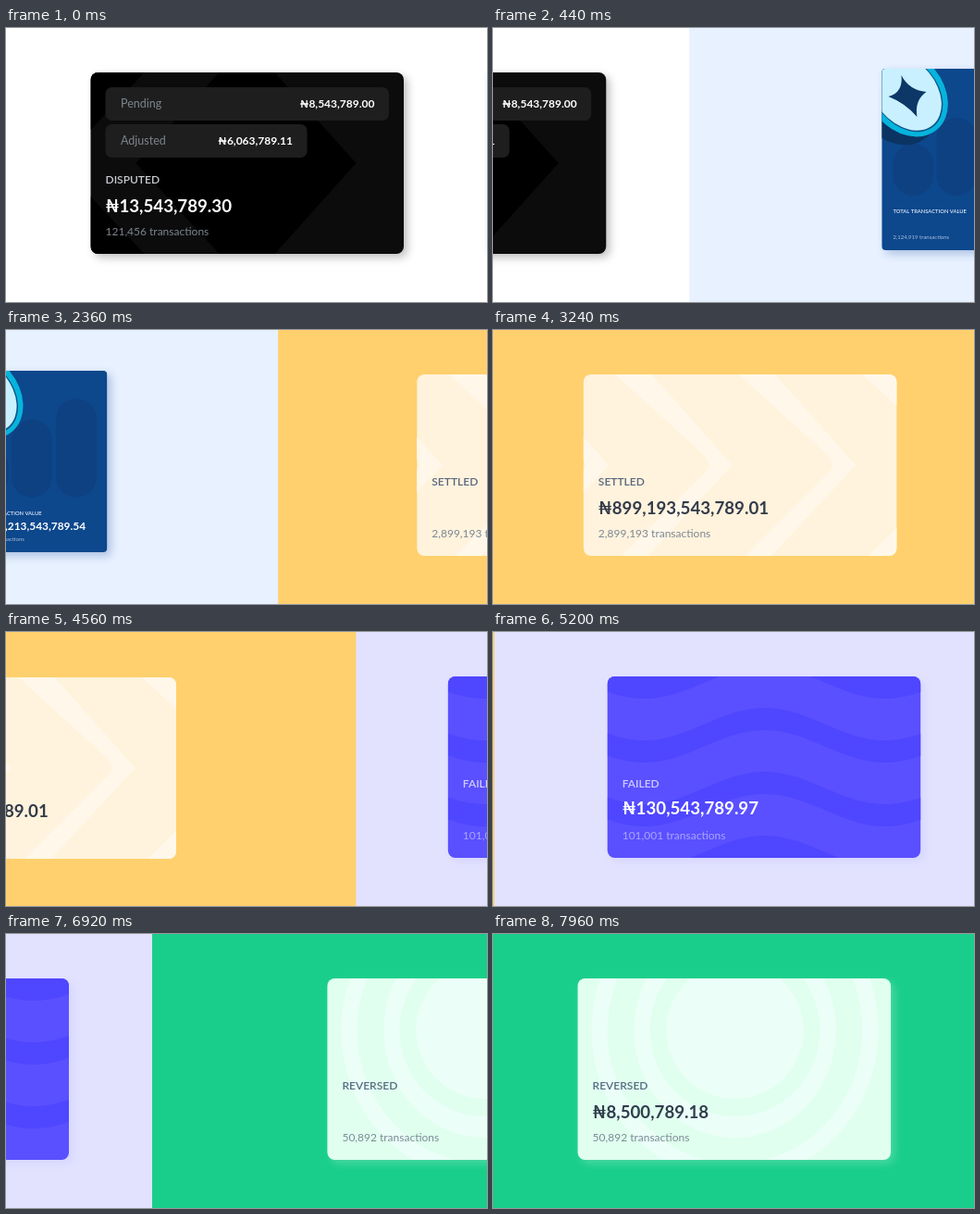
Recreate the animation shown at these times as an HTML page with a canvas. Size 520 by 296 pixels, loop 8 s.

```html
<!DOCTYPE html>
<html lang="en">
<head>
<meta charset="utf-8">
<title>Transaction cards</title>
<style>
  html, body { margin: 0; width: 100%; height: 100%; overflow: hidden; }
  canvas { display: block; }
</style>
</head>
<body>
<canvas id="stage" width="520" height="296"></canvas>
<script>
const ctx = document.getElementById('stage').getContext('2d');
const W = 520, H = 296, LOOP = 8000;
const SLIDE_STARTS = [0, 1960, 4200, 6440];

const clamp = v => Math.min(1, Math.max(0, v));

// Cubic bezier easing with control points (x1, 0) and (x2, 1).
function bezier(x1, x2) {
  return x => {
    x = clamp(x);
    let lo = 0, hi = 1, s = 0.5;
    for (let i = 0; i < 24; i++) {
      s = (lo + hi) / 2;
      const r = 1 - s;
      if (3 * s * r * r * x1 + 3 * s * s * r * x2 + s ** 3 < x) lo = s; else hi = s;
    }
    return s * s * (3 - 2 * s);
  };
}
const panelEase = bezier(0.62, 0.06);
const cardEase = bezier(0.33, 0);

function polygon(color, ...points) {
  ctx.fillStyle = color;
  ctx.beginPath();
  points.forEach(([x, y]) => ctx.lineTo(x, y));
  ctx.fill();
}

function roundRect(color, x, y, w, h, r) {
  ctx.fillStyle = color;
  ctx.beginPath();
  ctx.roundRect(x, y, w, h, r);
  ctx.fill();
}

function ellipse(color, x, y, rx, ry, tilt = 0) {
  ctx.fillStyle = color;
  ctx.beginPath();
  ctx.ellipse(x, y, rx, ry, tilt, 0, Math.PI * 2);
  ctx.fill();
}

function text(str, x, y, size, weight, color, align = 'left') {
  ctx.font = `${weight} ${size}px Lato, "Open Sans", sans-serif`;
  ctx.textAlign = align;
  ctx.fillStyle = color;
  ctx.fillText(str, x, y);
}

function pill(y, width, name, amount) {
  roundRect('#1e1e1e', 16, y, width, 36, 7);
  text(name, 32.5, y + 22, 12.5, 400, '#7f858e');
  text(amount, width + 0.5, y + 22, 12, 700, '#fff', 'right');
}

function drawDisputed() {
  polygon('#000', [139, 0], [199, 0], [287, 98], [199, 196], [139, 196], [49, 98]);
  polygon('#000', [0, 0], [58, 0], [0, 62]);
  polygon('#000', [0, 196], [58, 196], [0, 134]);
  pill(16, 306.5, 'Pending', '₦8,543,789.00');
  pill(56, 218, 'Adjusted', '₦6,063,789.11');
}

function drawCoin() {
  const tilt = 50 * Math.PI / 180;
  ellipse('#0c3463', 14, 35, 52, 40, tilt);
  ellipse('#06b4dc', 26, 26, 52, 40, tilt);
  ellipse('#0d5486', 26, 26, 47, 34, tilt);
  ellipse('#c9f0ff', 25.5, 25.5, 46, 33, tilt);
  ctx.fillStyle = '#0c3766';
  ctx.beginPath();
  ctx.moveTo(21, 7);
  ctx.quadraticCurveTo(29, 23, 48, 25);
  ctx.quadraticCurveTo(35, 34, 38, 52);
  ctx.quadraticCurveTo(25, 37, 7, 30);
  ctx.quadraticCurveTo(23, 26, 21, 7);
  ctx.fill();
}

function drawTotal() {
  [[12, 81], [59, 53], [107, 30]].forEach(([x, y]) =>
    roundRect('#0e4182', x, y, 43.5, 137 - y, 21.7));
  drawCoin();
}

function drawSettled() {
  for (let i = 0; i < 4; i++) {
    const tip = 27 + i * 133.5;
    polygon('#fff8ea', [tip - 87, 0], [tip, 98], [tip - 91, 196],
      [tip - 119, 196], [tip - 29, 106], [tip - 24, 98], [tip - 29, 88], [tip - 126, 0]);
  }
}

function drawFailed() {
  const wave = x => 17.5 * Math.cos(Math.PI * 2 * (x - 170) / 260);
  for (let top = -17.5; top < 220; top += 69) {
    const upper = [], lower = [];
    for (let x = 0; x <= 340; x += 4) {
      upper.push([x, top - wave(x)]);
      lower.unshift([x, top + 24 - wave(x)]);
    }
    polygon('#4f46ff', ...upper, ...lower);
  }
}

function drawReversed() {
  const light = '#ebfff8', tint = '#e0ffef';
  [[155, 162, light], [138, 144, tint], [109, 116, light], [92, 93, tint], [74, 74, light]]
    .forEach(([rx, ry, color]) => ellipse(color, 170, 56, rx, ry));
}

const wide = { x: 91.5, y: 48, w: 338.5, h: 196, r: 8, exit: 1, drop: 0,
  textX: 16, rows: [120, 151, 176], sizes: [12, 18.7, 12] };

const slides = [
  { ...wide, bg: '#fff', fill: '#0c0c0c', shadow: 'rgba(0,0,0,.25)', art: drawDisputed,
    label: 'DISPUTED', amount: '₦13,543,789.30', count: '121,456 transactions',
    colors: ['#c9cbd0', '#fff', '#7f858e'] },
  { ...wide, bg: '#e7f1ff', fill: '#0d478c', shadow: 'rgba(40,80,160,.3)', art: drawTotal,
    x: 173, y: 44, w: 162, r: 4, textX: 12, rows: [156, 171.5, 183.5], sizes: [5.8, 11.9, 6],
    label: 'TOTAL TRANSACTION VALUE', amount: '₦2,146,213,543,789.54', count: '2,124,919 transactions',
    colors: ['#e3eefb', '#fff', '#a9c0dc'] },
  { ...wide, bg: '#ffd06d', fill: '#fff3dd', shadow: 'transparent', art: drawSettled,
    exit: 1.737, drop: 3.6,
    label: 'SETTLED', amount: '₦899,193,543,789.01', count: '2,899,193 transactions',
    colors: ['#5a6780', '#333b4a', '#7f8694'] },
  { ...wide, bg: '#e2e2ff', fill: '#5a50ff', shadow: 'rgba(90,80,255,.08)', art: drawFailed,
    label: 'FAILED', amount: '₦130,543,789.97', count: '101,001 transactions',
    colors: ['#cfccff', '#fff', '#a9a4ff'] },
  { ...wide, bg: '#19ce8a', fill: '#e0ffef', shadow: 'rgba(255,255,255,.22)', art: drawReversed,
    label: 'REVERSED', amount: '₦8,500,789.18', count: '50,892 transactions',
    colors: ['#566b82', '#2f3e4c', '#7b8c96'] },
];

function drawCard(s, x, y, amountAlpha, amountShift) {
  ctx.save();
  ctx.translate(x, y);
  ctx.shadowColor = s.shadow;
  ctx.shadowBlur = 10;
  ctx.shadowOffsetX = ctx.shadowOffsetY = 4;
  roundRect(s.fill, 0, 0, s.w, s.h, s.r);
  ctx.shadowColor = 'transparent';
  ctx.clip();
  s.art();
  text(s.label, s.textX, s.rows[0], s.sizes[0], 600, s.colors[0]);
  text(s.count, s.textX, s.rows[2], s.sizes[2], 400, s.colors[2]);
  ctx.globalAlpha = amountAlpha;
  text(s.amount, s.textX, s.rows[1] + amountShift, s.sizes[1], 700, s.colors[1]);
  ctx.restore();
}

function draw(time) {
  const index = SLIDE_STARTS.findLastIndex(start => time >= start);
  const t = time - SLIDE_STARTS[index];
  const from = slides[index], to = slides[index + 1];
  const shift = W * panelEase(t / 1095);
  const entry = cardEase((t - 180) / 1370);

  ctx.fillStyle = from.bg;
  ctx.fillRect(0, 0, W, H);
  drawCard(from, from.x - shift * from.exit, from.y + from.drop * shift / W, 1, 0);

  ctx.fillStyle = to.bg;
  ctx.fillRect(W - shift, 0, W, H);
  drawCard(to, W + (to.x - W) * entry, to.y, clamp((t - 550) / 300), -20 * (1 - entry));
}

const begin = performance.now();
function tick() {
  draw((performance.now() - begin) % LOOP);
  requestAnimationFrame(tick);
}
tick();
</script>
</body>
</html>
```
